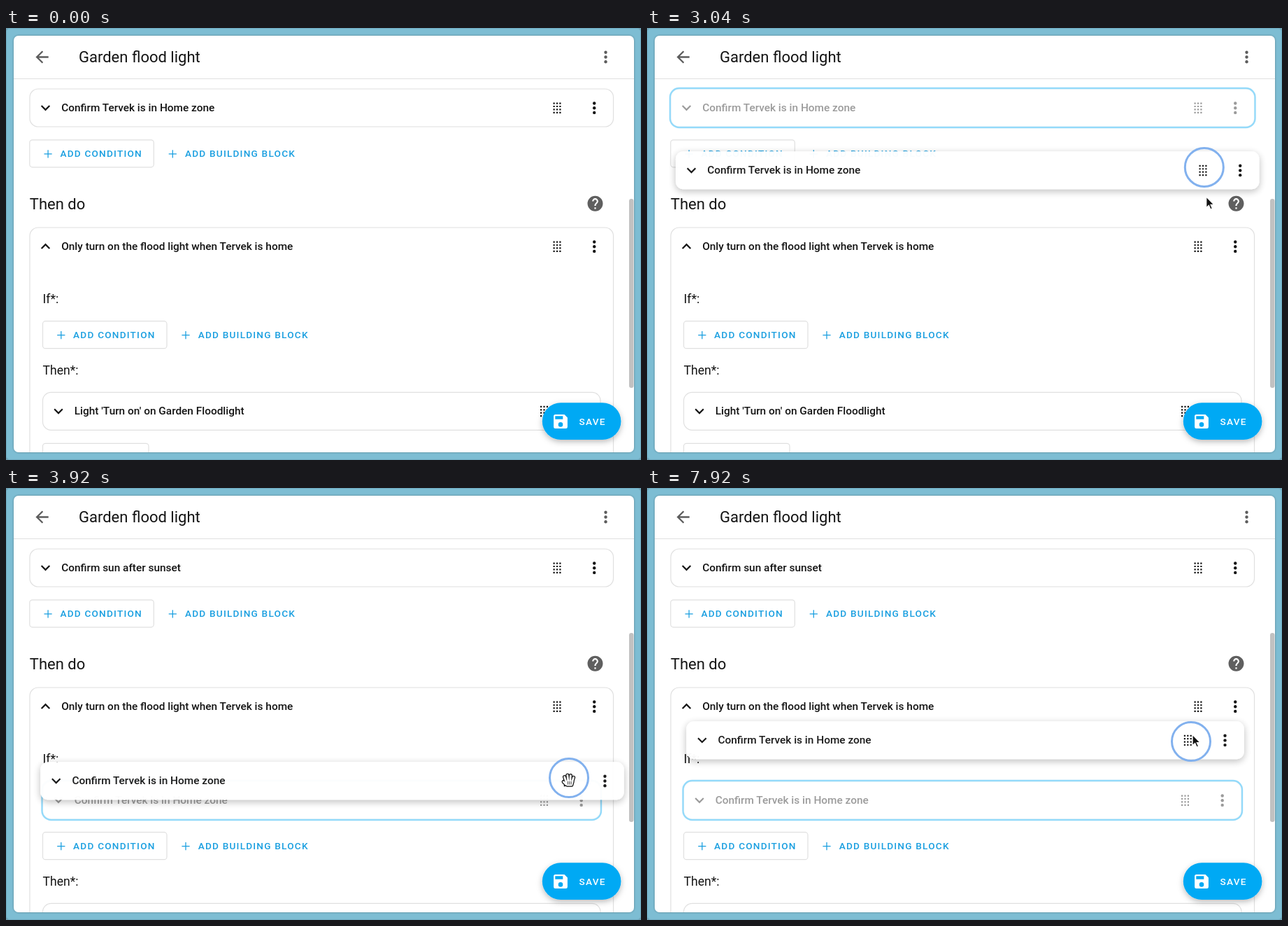
Animation, 908 px wide and 617 px high, one loop 8 s. Source, as an HTML page:

```html
<!DOCTYPE html>
<html lang="en">
<head>
<meta charset="utf-8">
<title>Automation editor</title>
<style>
  html, body { margin: 0; width: 100%; height: 100%; overflow: hidden; background: #7dbdd3; }
  svg { display: block; width: 908px; height: 617px; font-family: Roboto, sans-serif; fill: #141414; }
  .row { font-size: 15.4px; font-weight: 500; }
  .big { font-size: 22px; }
  .label { font-size: 17.6px; }
  .caps { font-size: 13.6px; font-weight: 500; letter-spacing: 1.21px; }
  .line { fill: none; stroke: #e0e0e0; stroke-width: 1.2; }
</style>
</head>
<body>
<svg id="stage" viewBox="0 0 908 617"></svg>
<script>
const LOOP = 8000, STEP = 80, LAG = 70;
const BLUE = '#03a9f4', ACCENT = '#1a9fe0';
const HOME = 'Confirm Tervek is in Home zone';
const SUN = 'Confirm sun after sunset';

const ICONS = {
  back: 'M20,11V13H8L13.5,18.5L12.08,19.92L4.16,12L12.08,4.08L13.5,5.5L8,11H20Z',
  down: 'M7.41,8.58L12,13.17L16.59,8.58L18,10L12,16L6,10L7.41,8.58Z',
  up: 'M7.41,15.41L12,10.83L16.59,15.41L18,14L12,8L6,14L7.41,15.41Z',
  plus: 'M19,12.8H12.8V19H11.2V12.8H5V11.2H11.2V5H12.8V11.2H19V12.8Z',
  save: 'M15,9H5V5H15M12,19A3,3 0 0,1 9,16A3,3 0 0,1 12,13A3,3 0 0,1 15,16A3,3 0 0,1 12,19M17,3H5C3.89,3 3,3.9 3,5V19A2,2 0 0,0 5,21H19A2,2 0 0,0 21,19V7L17,3Z',
  help: 'M15.07,11.25L14.17,12.17C13.45,12.89 13,13.5 13,15H11V14.5C11,13.39 11.45,12.39 12.17,11.67L13.41,10.41C13.78,10.05 14,9.55 14,9C14,7.89 13.1,7 12,7A2,2 0 0,0 10,9H8A4,4 0 0,1 12,5A4,4 0 0,1 16,9C16,9.88 15.64,10.67 15.07,11.25M13,19H11V17H13M12,2A10,10 0 0,0 2,12A10,10 0 0,0 12,22A10,10 0 0,0 22,12C22,6.47 17.5,2 12,2Z'
};

const icon = (name, x, y, fill = '#141414', k = 1.1) =>
  `<path d="${ICONS[name]}" fill="${fill}" fill-rule="evenodd" transform="translate(${x} ${y}) scale(${k}) translate(-12 -12)"/>`;
const text = (cls, x, y, str, fill = '#141414', id = '') =>
  `<text class="${cls}" x="${x}" y="${y}" fill="${fill}"${id && ` id="${id}"`}>${str}</text>`;
const box = (x, y, w, h, r, attrs = 'class="line"') =>
  `<rect x="${x}" y="${y}" width="${w}" height="${h}" rx="${r}" ${attrs}/>`;
const menu = (x, y, fill = '#141414') =>
  [-6.7, 0, 6.7].map(d => `<circle cx="${x}" cy="${y + d}" r="2.2" fill="${fill}"/>`).join('');

function grip(x, y) {
  let d = '';
  for (let row = 0; row < 4; row++)
    for (let col = 0; col < 3; col++)
      d += `M${x - 5.5 + col * 4.4} ${y - 7.7 + row * 4.4}h2.2v2.2h-2.2z`;
  return `<path d="${d}"/>`;
}

// Contents of a collapsed or expanded card header, relative to its corner.
const header = (w, str, id, chevron = 'down') =>
  icon(chevron, 22.5, 27) + text('row', 45.2, 32.2, str, '#141414', id) +
  grip(w - 80.5, 27.2) + menu(w - 27.3, 27.2);

const card = (x, y, w, str, id) =>
  `<g transform="translate(${x} ${y})" id="${id}">${box(0, 0, w, 54, 12)}` +
  box(-1, -1, w + 2, 56, 13, `id="${id}Glow" fill="none" stroke="${BLUE}" stroke-width="2.4"`) +
  header(w, str, id + 'Text') + '</g>';

const buttons = (x, y) =>
  box(x, y, 177.5, 39, 4) + icon('plus', x + 26.3, y + 20, ACCENT, .8) +
  text('caps', x + 43.6, y + 24.6, 'ADD CONDITION', ACCENT) +
  icon('plus', x + 204.5, y + 20, ACCENT, .8) +
  text('caps', x + 222.2, y + 24.6, 'ADD BUILDING BLOCK', ACCENT);

const shadow = (id, dy, blur, alpha) =>
  `<filter id="${id}" x="-20%" y="-60%" width="140%" height="220%">` +
  `<feDropShadow dx="0" dy="${dy}" stdDeviation="${blur}" flood-color="#000" flood-opacity="${alpha}"/></filter>`;

const HAND = 'M-4 2L-6.2-4.6M-1 1L-1.9-7M2 1L2.6-6.6M5 2L6.8-3.8M-4 6L-7.6 2.4M-4 2L-2 7H4L5.4 2Z';

document.getElementById('stage').innerHTML = `
  <defs>
    ${shadow('lift', 3, 5.5, .27)}${shadow('fabShade', 3, 4, .27)}${shadow('rim', 0, 1.5, .35)}
    <clipPath id="panel">${box(11, 11, 887, 595, 7, '')}</clipPath>
  </defs>
  ${box(0, 0, 908, 617, 0, 'fill="#6f9fb2"')}
  ${box(.5, .5, 907, 616, 5, 'fill="#7dbdd3" stroke="#6fa9bf"')}
  ${box(11, 11, 887, 595, 7, 'fill="#fff" filter="url(#rim)"')}
  <g clip-path="url(#panel)">
    ${icon('back', 51.5, 41.5, '#5c5c5c', 1.15)}
    ${text('big', 104, 48.7, 'Garden flood light')}
    ${menu(857.5, 41.5, '#5c5c5c')}
    <path class="line" d="M11 72.5H898"/>
    ${card(34, 87, 834.5, HOME, 'top')}
    ${buttons(33.8, 159.8)}
    ${text('big', 33.8, 258.5, 'Then do')}
    ${icon('help', 842.5, 250.8, '#5f5f5f')}
    ${box(34, 285, 834.5, 420, 12)}
    <g transform="translate(34 285)">${header(834.5, 'Only turn on the flood light when Tervek is home', 'action', 'up')}</g>
    ${text('label', 52.5, 393, 'If*:')}
    ${card(52.5, 419, 797.5, HOME, 'nested')}
    <g id="lower">
      ${buttons(52.5, 418.7)}
      ${text('label', 52.5, 495.2, 'Then*:')}
      ${card(52.5, 520.3, 797.5, "Light 'Turn on' on Garden Floodlight", 'light')}
      ${box(52.5, 593.3, 151.5, 39, 4)}
    </g>
    ${box(891, 0, 6.5, 270, 3.2, 'id="thumb" fill="#c1c1c1"')}
  </g>
  ${box(766.8, 535.3, 112.6, 52.8, 26.4, `fill="${BLUE}" filter="url(#fabShade)"`)}
  ${icon('save', 793, 562, '#fff')}
  ${text('caps', 819.5, 567.3, 'SAVE', '#fff')}
  <g id="drag" opacity=".97">
    <rect id="dragBox" height="54" rx="11" fill="#fff" filter="url(#lift)"/>
    <g id="dragWide">${header(834.5, HOME, 'wideText')}</g>
    <g id="dragSlim">${header(797.5, HOME, 'slimText')}</g>
  </g>
  <circle id="ring" fill="none" stroke="#82b1ee" stroke-width="3"/>
  <path id="arrow" d="M0 0V15.5L3.6 12.2L6 17.8L8.6 16.7L6.2 11.3H11Z" fill="#111" stroke="#fff" stroke-width="1.2"/>
  <g id="hand" stroke-linecap="round" stroke-linejoin="round">
    <path d="${HAND}" fill="#111" stroke="#111" stroke-width="5.2"/>
    <path d="${HAND}" fill="#fff" stroke="#fff" stroke-width="2.8"/>
    <path d="M-1.4 2V6M1 2V6M3.4 2V6" stroke="#333" stroke-width=".9"/>
  </g>`;

const el = id => document.getElementById(id);
const show = (id, on) => el(id).setAttribute('display', on ? 'inline' : 'none');
const move = (id, x, y) => el(id).setAttribute('transform', `translate(${x} ${y})`);
const within = (t, a, b) => t >= a && t < b;

// Pointer path: time, x, y
const PATH = [
  [700, 915, 330], [1440, 790, 114], [1600, 790.5, 110], [2800, 790.5, 110],
  [3360, 806.5, 336], [3600, 806, 362], [3840, 805, 411], [3920, 805, 414],
  [4240, 803, 428], [4400, 803, 428], [5120, 775, 512], [6200, 775, 512],
  [6560, 778, 480], [6960, 774, 448], [7280, 774, 448], [7920, 778, 362], [8100, 784, 333]
];

function pointer(t) {
  if (t <= PATH[0][0]) return PATH[0].slice(1);
  const i = Math.max(1, PATH.findIndex(p => p[0] >= t));
  const [t0, x0, y0] = PATH[i - 1], [t1, x1, y1] = PATH[i];
  const u = (t - t0) / (t1 - t0), e = u * u * (3 - 2 * u);
  return [x0 + (x1 - x0) * e, y0 + (y1 - y0) * e];
}

function ghost(id, on) {
  el(id).setAttribute('opacity', on ? .42 : 1);
  show(id + 'Glow', on);
}

function render(t) {
  const first = within(t, 2880, 4240), second = t >= 7360;
  const moved = t >= 3680;
  const [rx, ry] = pointer(t);
  const [cx, cy] = pointer(t + LAG);

  el('topText').textContent = moved ? SUN : HOME;
  ghost('top', first && !moved);
  ghost('nested', (first && moved) || second);
  show('nested', moved);
  move('lower', 0, moved ? 73 : 0);
  el('thumb').setAttribute('y', moved ? 207 : 244);

  show('drag', first || second);
  show('dragWide', first);
  show('dragSlim', second);
  el('dragBox').setAttribute('width', second ? 797.5 : 834.5);
  if (second) move('drag', rx - 774 + 52.3, ry - 448 + 419.2);
  else move('drag', rx - 790 + 34.2, ry - 110 + 87.3);

  const press = t >= 7120 ? 7120 : 2640;
  show('ring', within(t, 2640, 4240) || t >= 7120);
  el('ring').setAttribute('cx', rx);
  el('ring').setAttribute('cy', ry);
  el('ring').setAttribute('r', Math.min(27.5, 21 + (t - press) / 32));

  const grab = within(t, 1360, 2880) || within(t, 3680, 4400) || within(t, 6800, 7360);
  show('hand', grab);
  show('arrow', !grab && t > 700);
  move('hand', cx, cy + 1.5);
  move('arrow', cx, cy);
}

show('lightGlow', false);
const start = performance.now();
function tick() {
  const t = (performance.now() - start) % LOOP;
  render(Math.floor(t / STEP) * STEP);
  requestAnimationFrame(tick);
}
tick();
</script>
</body>
</html>
```
